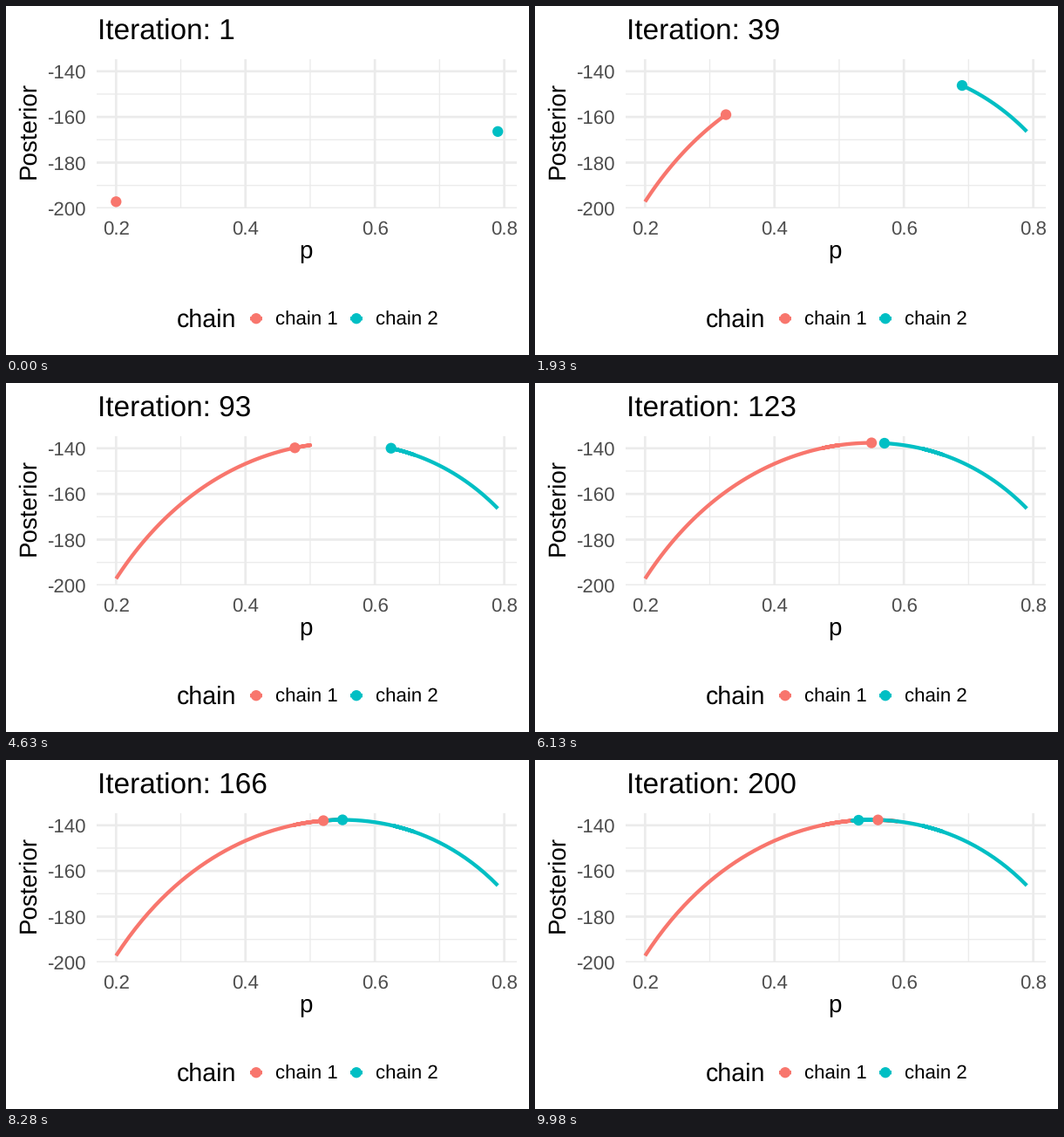
A matplotlib script for the animation above (10 s loop, 600 by 400 pixels).

```python
import numpy as np
import matplotlib.pyplot as plt
from matplotlib.animation import FuncAnimation
from matplotlib.patches import Circle, Rectangle

W, H, DPI = 600, 400, 100
FRAMES, INTERVAL, STEPS = 400, 25, 200
RED, TEAL, GRID, GREY = "#F8766D", "#00BFC4", "#EBEBEB", "#4D4D4D"
LEFT, RIGHT, TOP, BOTTOM = 104.4, 586.1, 60.8, 232.1

plt.rcParams["font.family"] = "Liberation Sans"
plt.rcParams["text.hinting"] = "none"


def pt(px):
    return px * 72 / DPI


def log_posterior(p):
    """Log-likelihood of 110 successes in 200 trials."""
    return 110 * np.log(p) + 90 * np.log(1 - p)


def x_px(p):
    return 126.3 + 742.2 * (p - 0.2)


def y_px(ll):
    return 74.8 - 2.617 * (ll + 140)


# Pixel stage with y pointing down
fig = plt.figure(figsize=(W / DPI, H / DPI), dpi=DPI, facecolor="white")
stage = fig.add_axes([0, 0, 1, 1])
stage.set(xlim=(0, W), ylim=(H, 0))
stage.set_axis_off()
panel = Rectangle((LEFT, TOP), RIGHT - LEFT, BOTTOM - TOP, transform=stage.transData)


def label(x, y, text, size, color="black", **kw):
    return stage.text(x, y, text, fontsize=size, color=color, **kw)


def grid_line(xs, ys, width):
    line, = stage.plot(xs, ys, color=GRID, lw=pt(width), snap=False, zorder=0)
    line.set_clip_path(panel)


def stroke(xs, ys, color):
    return stage.plot(xs, ys, color=color, lw=pt(4.3), snap=False, zorder=2,
                      solid_capstyle="butt", solid_joinstyle="round")[0]


def dot(x, y, color):
    return stage.add_patch(Circle((x, y), 6.15, color=color, lw=0, zorder=3))


# Grid: odd tenths and odd tens are minor, even ones major and labelled
for width, first in ((1.35, 3), (2.69, 2)):
    for tenth in range(first, 9, 2):
        grid_line([x_px(tenth / 10)] * 2, [TOP, BOTTOM], width)
    for ten in range(first + 12, 21, 2):
        grid_line([LEFT, RIGHT], [y_px(-10 * ten)] * 2, width)
for k in range(4):
    p, ll = 0.2 + 0.2 * k, -140 - 20 * k
    label(x_px(p), 261.3, f"{p:.1f}", 16, GREY, ha="center")
    label(92, y_px(ll) + 8, str(ll), 16, GREY, ha="right")

# Titles
title = label(LEFT + 0.4, 39, "", 24)
label(343.8, 288.5, "p", 20, ha="center")
label(38.8, 142, "Posterior", 20, rotation=90, ha="right", va="center")

# Legend
label(195.5, 368, "chain", 20.6)
for x, color, name in ((287, RED, "chain 1"), (402, TEAL, "chain 2")):
    stroke([x - 7, x + 7], [358.2, 358.2], color)
    dot(x, 358.2, color)
    label(x + 21.7, 366, name, 16)


class Chain:
    """Walk in half-percent steps between (iteration, percent) turning points."""

    steps = np.arange(1, STEPS + 1)

    def __init__(self, color, turns):
        p = np.round(2 * np.interp(self.steps, *zip(*turns))) / 200
        self.x, self.y = x_px(p), y_px(log_posterior(p))
        self.trail, self.dot = stroke([], [], color), dot(0, 0, color)

    def show(self, it):
        done = int(it)
        x, y = (np.interp(it, self.steps, v) for v in (self.x, self.y))
        self.trail.set_data(np.append(self.x[:done], x), np.append(self.y[:done], y))
        self.dot.center = x, y


chains = [
    Chain(RED, [(1, 20), (39, 32.4), (62, 39), (72, 48), (80, 50), (93, 47.5),
                (123, 55), (152, 50), (166, 52), (185, 59), (200, 56)]),
    Chain(TEAL, [(1, 79), (39, 69), (62, 67), (69, 63), (82, 66), (93, 62.5),
                 (123, 57), (156, 52), (166, 55), (200, 53)]),
]


def update(frame):
    it = 1 + (STEPS - 1) * frame / (FRAMES - 1)
    title.set_text(f"Iteration: {round(it)}")
    for chain in chains:
        chain.show(it)


anim = FuncAnimation(fig, update, frames=FRAMES, interval=INTERVAL,
                     repeat=True, repeat_delay=0, blit=False)
plt.show()
```
